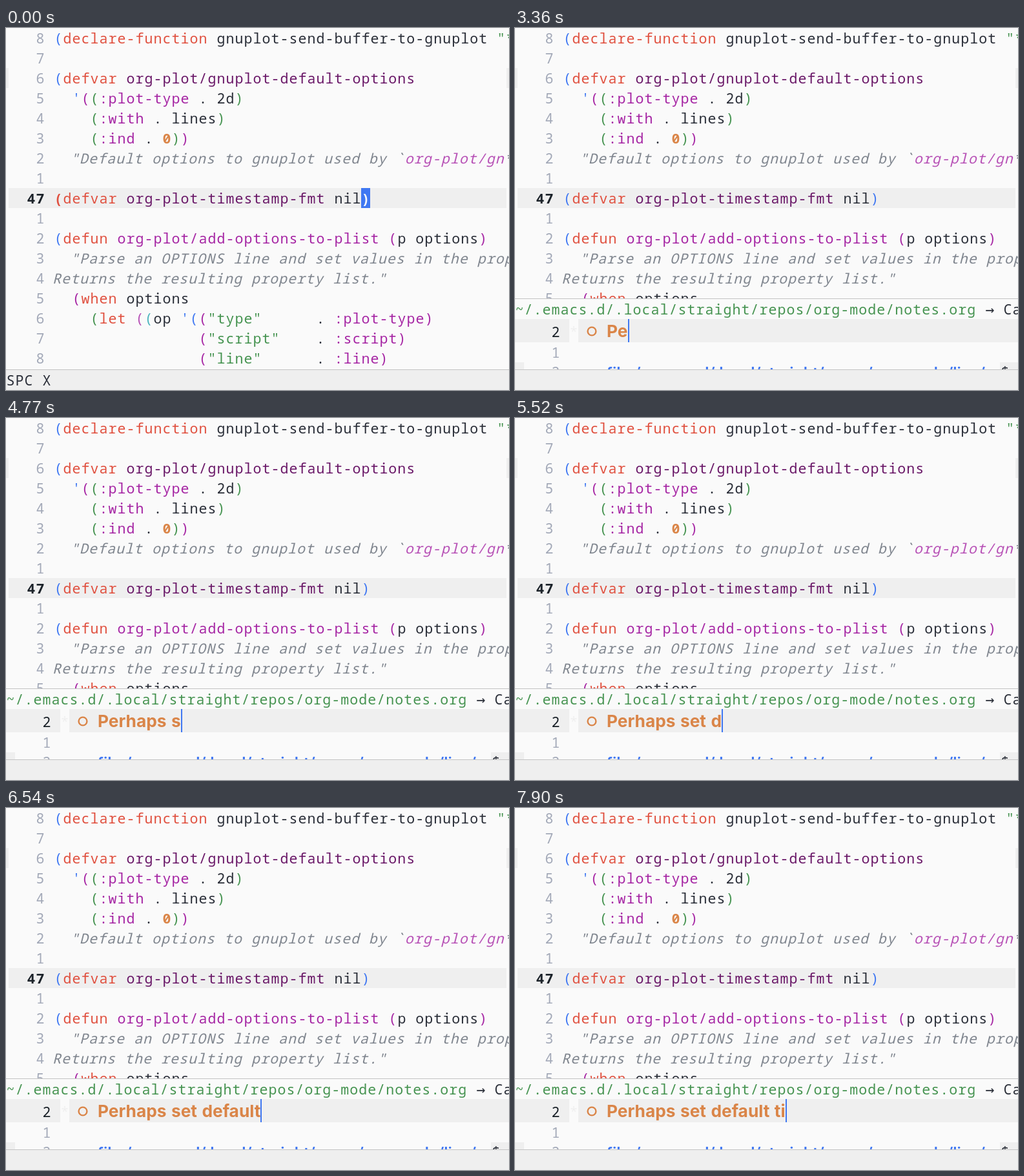
These frames come from a looping animation (779 by 561 pixels, 8000 ms). An HTML page:

```html
<!DOCTYPE html>
<html lang="en">
<head>
<meta charset="utf-8">
<title>Capture a note</title>
<style>
html, body { margin: 0; width: 100%; height: 100%; overflow: hidden; background: #fafafa; }
svg { display: block; width: 100%; height: 100%; }
text { white-space: pre; }
.mono { font: 500 21.6px "Noto Sans Mono", "DejaVu Sans Mono", monospace; letter-spacing: 1.04px; }
.doc { font-style: italic; }
.strong { font-weight: 700; }
.arrow { font: 23px "DejaVu Sans Mono", monospace; }
.title { font: 700 26.3px Inter, "Open Sans", sans-serif; word-spacing: 1.2px; }
.link { font: 600 24px Inter, "Open Sans", sans-serif; }
</style>
</head>
<body>
<svg id="stage" viewBox="0 0 779 561"></svg>
<script>
const NS = "http://www.w3.org/2000/svg";
const CELL = 14, LEFT = 74, ROW = 31;
const LOOP = 8000, OPEN = 1000;
const BG = "#fafafa", BAND = "#efefef", RULE = "#c4c4c4", INK = "#2a2e38", DARK = "#1b2229",
      DIM = "#a3a9b8", BLUE = "#4078f2", ORANGE = "#da8548", GREEN = "#459350";

// colour codes used in the code lines below
const INKS = {
  k: INK, r: "#e0503f", v: "#6a1868", f: "#a626a4", b: BLUE, g: GREEN,
  o: ORANGE, d: "#7f858e", m: "#b751b6", t: "#4db5bd"
};

// [line number, segments]; each segment is "~", a colour code and its text
const LINES = [
  [8, '~b(~rdeclare-function~k gnuplot-send-buffer-to-gnuplot~g "*'],
  [7, ""],
  [6, "~b(~rdefvar~v org-plot/gnuplot-default-options"],
  [5, "~b  '~f(~g(~f:plot-type~k . 2d~g)"],
  [4, "~g    (~f:with~k . lines~g)"],
  [3, "~g    (~f:ind~k . ~o0~g)~f)"],
  [2, '~d  "Default options to gnuplot used by `~morg-plot/gn~d*'],
  [1, ""],
  [47, "~b(~rdefvar~v org-plot-timestamp-fmt~k nil~b)"],
  [1, ""],
  [2, "~b(~rdefun~f org-plot/add-options-to-plist (~kp options~f)"],
  [3, '~d  "Parse an OPTIONS line and set values in the prop'],
  [4, '~dReturns the resulting property list."'],
  [5, "~f  (~rwhen~k options"],
  [6, "~g    (~rlet~m (~t(~kop ~b'(~f(~g\"type\"~k      . ~f:plot-type)"],
  [7, '~f                (~g"script"~k    . ~f:script)'],
  [8, '~f                (~g"line"~k      . ~f:line)']
];

const TITLE = "Perhaps set default ti";
// [time, letters typed]
const KEYS = [
  [1000, 1], [3360, 2], [3600, 3], [3720, 4], [3900, 5], [4040, 6], [4320, 7],
  [4540, 8], [4770, 9], [5160, 11], [5380, 12], [5520, 13], [5660, 14], [5790, 15],
  [5980, 16], [6170, 17], [6310, 18], [6540, 19], [6750, 20], [6950, 21], [7900, 22]
];

function add(parent, tag, attrs = {}, content = "") {
  const el = document.createElementNS(NS, tag);
  for (const key in attrs) el.setAttribute(key, attrs[key]);
  el.textContent = content;
  return parent.appendChild(el);
}
const rect = (parent, x, y, width, height, fill) => add(parent, "rect", { x, y, width, height, fill });
const label = (parent, x, y, str, fill, cls = "mono") =>
  add(parent, "text", { x: x + 0.5, y, fill, class: cls }, str);

function codeLine(parent, [num, code], i) {
  const y = 24 + ROW * i, digits = String(num), current = num === 47;
  label(parent, 60 - CELL * digits.length, y, digits, current ? DARK : DIM, current ? "mono strong" : "mono");
  const isDoc = code.startsWith("~d");
  const line = label(parent, isDoc ? LEFT - 2.5 : LEFT, y, "", INK, isDoc ? "mono doc" : "mono");
  for (const part of code.split("~").slice(1)) {
    const c = part[0];
    add(line, "tspan", { fill: INKS[c], class: c === "o" ? "strong" : "" }, part.slice(1));
  }
}

const stage = document.getElementById("stage");
rect(stage, 0, 0, 779, 561, BG);
rect(stage, 0, 62, 4, 31, BAND);
rect(stage, 775, 62, 4, 31, BAND);
rect(stage, 4, 248, 771, 31, BAND);
LINES.forEach((line, i) => codeLine(stage, line, i));

// matched parentheses and block cursor
const point = add(stage, "g");
rect(point, LEFT, 249, CELL, 30, BAND);
label(point, LEFT, 272, "(", INKS.r, "mono strong");
rect(point, 550, 248, CELL, 31, BLUE);
label(point, 550, 272, ")", BG, "mono strong");

// capture window
const capture = add(stage, "g");
rect(capture, 0, 419, 779, 111, BG);
rect(capture, 0, 419, 779, 1, RULE);
label(capture, 0, 444, "~/.emacs.d/.local/straight/repos/org-mode/notes.org", GREEN);
label(capture, 52 * CELL, 444, "→", INK, "arrow");
label(capture, 54 * CELL, 444, "Ca", INK);
rect(capture, 0, 451, 84, 36, BAND);
rect(capture, 98, 451, 681, 36, BAND);
label(capture, 56, 479, "2", DARK);
label(capture, 84, 479, "*", BAND);
add(capture, "circle", { cx: 119, cy: 470, r: 6.4, fill: "none", stroke: ORANGE, "stroke-width": 2.4 });
const title = label(capture, 141.5, 479, "", ORANGE, "title");
const caret = rect(capture, 160, 451, 2, 36, BLUE);
label(capture, 56, 511, "1", DIM);
rect(capture, 0, 518, 14, 12, BAND);
rect(capture, 751, 518, 28, 12, BAND);
label(capture, 56, 541, "2", DIM);
label(capture, 141, 542.5, "file:/.emacs.d/.local/straight/repos/org-mode/lisp/", BLUE, "link");
label(capture, 752, 541, "$", INK);

// echo area
rect(stage, 0, 529, 779, 32, BAND);
rect(stage, 0, 529, 779, 1, RULE);
const echo = label(stage, 0, 554, "SPC X", INK);

const show = (el, on) => el.setAttribute("visibility", on ? "visible" : "hidden");

function draw(t) {
  const open = t >= OPEN;
  show(point, !open);
  show(echo, !open);
  show(capture, open);
  if (!open) return;
  const [, count] = KEYS.findLast(([at]) => t >= at);
  title.textContent = TITLE.slice(0, count);
  caret.setAttribute("x", Math.round(142 + title.getComputedTextLength()));
}

const start = performance.now();
function tick() {
  draw((performance.now() - start) % LOOP);
  requestAnimationFrame(tick);
}
tick();
</script>
</body>
</html>
```
